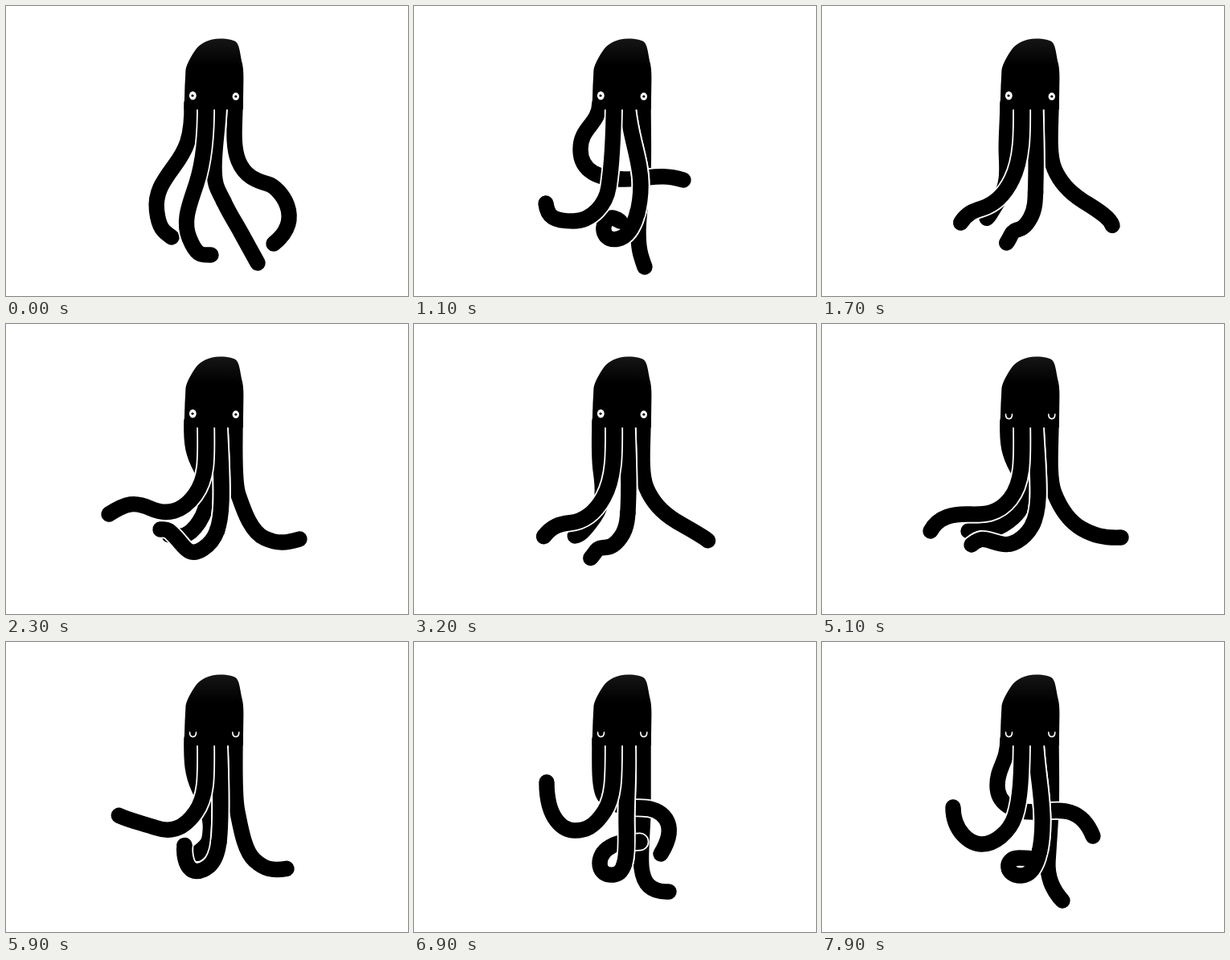
Write an HTML page without scripts that moves like this. It is 500 by 360 pixels and loops after 8000 ms.

```html
<!DOCTYPE html>
<html lang="en">
<head>
<meta charset="utf-8">
<title>Octopus</title>
<style>
html, body { margin: 0; width: 100%; height: 100%; overflow: hidden; background: #fff; }
svg { display: block; width: 500px; height: 360px; }

/* Arm poses: a, b hang; w, s, f spread; k, c, x curl */
.arm1 {
  --a: path("M231 120 C232 165 223 180 209 199 S185 232 187.500 254 S196 280 206 287");
  --b: path("M231 120 C232 150 220 168 206 189 S189 216 194 234 S215 269 243 266");
  --w: path("M231 120 C230 150 233 162 241 180 S254 222 234 242 S202 260 186 262");
  --s: path("M231 120 C230 150 233 162 243 180 S254 225 240 246 S215 264 203 262");
  --f: path("M231 120 C230 150 233 162 243 180 S258 222 238 240 S205 257 182 257");
  --k: path("M231 120 C231 150 230 170 234 185 S258 206 283 206 S331 224 307 263");
  --c: path("M231 120 C231 150 218 155 218 178 S238 211 262 211 S320 198 337 241");
  --x: path("M231 120 C230 148 207 150 207 178 S231 215 262 215 S305 207 335 216");
}
.arm2 {
  --a: path("M248.500 120 C249 165 245 195 237 220 S219 266 228 288 S242 309 255 309");
  --b: path("M248.500 120 C249 150 244 185 242 215 S235 265 241 285 S250 308 262 311");
  --w: path("M248.500 120 C249 165 251 193 234 215 S197 239 178 234 S145 232 128 248");
  --s: path("M248.500 120 C249 165 251 190 235 212 S200 238 180 229 S150 222 128 236");
  --f: path("M248.500 120 C249 165 251 195 234 217 S195 236 180 236 S145 238 135 257");
  --k: path("M248.500 120 C248 160 250 190 237 210 S213 234 200 234 S165 222 165 174");
  --c: path("M248.500 120 C248 165 247 195 240 216 S214 251 199 251 S163 235 163 205");
  --x: path("M248.500 120 C248 165 245 205 242 225 S222 267 198 267 S166 262 164 245");
}
.arm3 {
  --a: path("M264.500 120 C264 150 259 175 259 200 S264 228 271 243 S286 270 292 281 S307 308 313 319");
  --b: path("M264.500 120 C264 150 260 175 260 200 S270 232 278 246 S293 269 297 283 S306 310 309 322");
  --w: path("M265 120 C266 150 270 190 269 218 S264 260 250 271 S226 280 214 276 S200 274 190 280");
  --s: path("M265 120 C266 150 269 190 268 220 S262 268 245 279 S222 277 213 267 S202 254 192 255");
  --f: path("M265 120 C266 150 270 190 269 215 S262 255 248 266 S224 274 212 270 S196 266 186 274");
  --k: path("M265 120 C267 160 264 190 264 220 S268 287 248 289 S226 268 240 257 S265 249 281 248");
  --c: path("M265 120 C267 160 274 190 274 222 S268 289 248 290 S226 268 245 268 S256 269 259 272");
  --x: path("M265 120 C267 160 282 190 282 222 S272 285 254 289 S233 276 238 268 S250 263 256 267");
}
.arm4 {
  --a: path("M285 120 C285 145 281 172 289 192 S312 217 326 221 S373 264 333 295");
  --b: path("M285 120 C285 145 281 172 289 192 S312 217 323 227 S364 262 325 301");
  --w: path("M285 120 C285 150 281 188 289 207 S311 242 326 250 S355 262 379 258");
  --s: path("M285 120 C285 150 283 195 289 212 S304 258 322 266 S350 271 365 267");
  --f: path("M285 120 C285 150 281 190 289 210 S309 246 323 254 S350 266 372 265");
  --k: path("M285 120 C285 150 285 180 285 205 S281 262 283 280 S293 311 317 310");
  --c: path("M285 120 C285 150 286 180 285 205 S282 255 281 272 S285 306 299 321");
  --x: path("M285 120 C285 150 286 180 285 205 S279 260 279 280 S281 308 287 324");
}

.arm path {
  d: var(--a);
  fill: none;
  stroke: #000;
  stroke-width: 19.4;
  stroke-linecap: round;
  animation: swim 8s infinite;
}
.arm .edge { stroke: #fff; stroke-width: 23; }
/* Upper part, redrawn over the arm's own curl */
.arm .top { stroke-linecap: butt; stroke-dasharray: 60 100; }
.arm .edge.top { stroke-dasharray: 58 100; }

/* Ten steps a second */
@keyframes swim {
  0%     { d: var(--a); animation-timing-function: steps(5); }
  6.25%  { d: var(--w); animation-timing-function: steps(3); }
  10%    { d: var(--k); animation-timing-function: steps(3); }
  13.75% { d: var(--x); animation-timing-function: steps(4); }
  18.75% { d: var(--b); animation-timing-function: steps(3); }
  22.5%  { d: var(--w); animation-timing-function: steps(5); }
  28.75% { d: var(--s); animation-timing-function: steps(4); }
  33.75% { d: var(--x); animation-timing-function: steps(2); }
  36.25% { d: var(--b); animation-timing-function: steps(4); }
  41.25% { d: var(--w); animation-timing-function: steps(3); }
  45%    { d: var(--k); animation-timing-function: steps(3); }
  48.75% { d: var(--x); animation-timing-function: steps(3); }
  52.5%  { d: var(--b); animation-timing-function: steps(5); }
  58.75% { d: var(--w); animation-timing-function: steps(4); }
  63.75% { d: var(--f); animation-timing-function: steps(3); }
  67.5%  { d: var(--s); animation-timing-function: steps(15); }
  86.25% { d: var(--k); animation-timing-function: steps(10); }
  98.75%, 100% { d: var(--c); }
}

.open { animation: wake 8s step-end infinite; }
.shut { fill: none; stroke: #fff; stroke-width: 1.6; stroke-linecap: round; animation: sleep 8s step-end infinite; }
@keyframes wake { 0% { opacity: 1; } 58.75%, 100% { opacity: 0; } }
@keyframes sleep { 0% { opacity: 0; } 58.75%, 100% { opacity: 1; } }
</style>
</head>
<body>
<svg viewBox="0 0 500 360">
  <defs>
    <linearGradient id="shade" gradientUnits="userSpaceOnUse" x1="0" y1="40" x2="0" y2="74">
      <stop offset="0" stop-color="#161616"/>
      <stop offset="1" stop-color="#000"/>
    </linearGradient>
  </defs>

  <g class="arm arm4"><path class="edge"/><path/></g>
  <g class="arm arm1"><path class="edge"/><path/></g>
  <g class="arm arm3">
    <path class="edge"/><path/>
    <path class="edge top" pathLength="100"/><path class="top" pathLength="100"/>
  </g>
  <g class="arm arm2"><path class="edge"/><path/></g>

  <path fill="url(#shade)" d="M221.500 128.500 L222.500 98 L223.500 79 C225 71 231 61 236 54 C242 46 253 40.500 266 40.500 C276 40.500 284 42 287 45.500 C291 51 291 60 294 72 C295.500 79 295.500 88 295.300 96 L294.800 128.500 Z"/>

  <g class="open">
    <ellipse cx="232.300" cy="111.300" rx="4.400" ry="5.200" fill="#fff"/>
    <circle cx="232" cy="111.300" r="1.500"/>
    <ellipse cx="285.800" cy="112.300" rx="4.200" ry="4.800" fill="#fff"/>
    <circle cx="285.800" cy="112.300" r="1.500"/>
  </g>
  <g class="shut">
    <path d="M228.500 112 C228.500 119.500 236.500 119.500 236.500 112"/>
    <path d="M281.800 112 C281.800 119.500 289.800 119.500 289.800 112"/>
  </g>
</svg>
</body>
</html>
```
